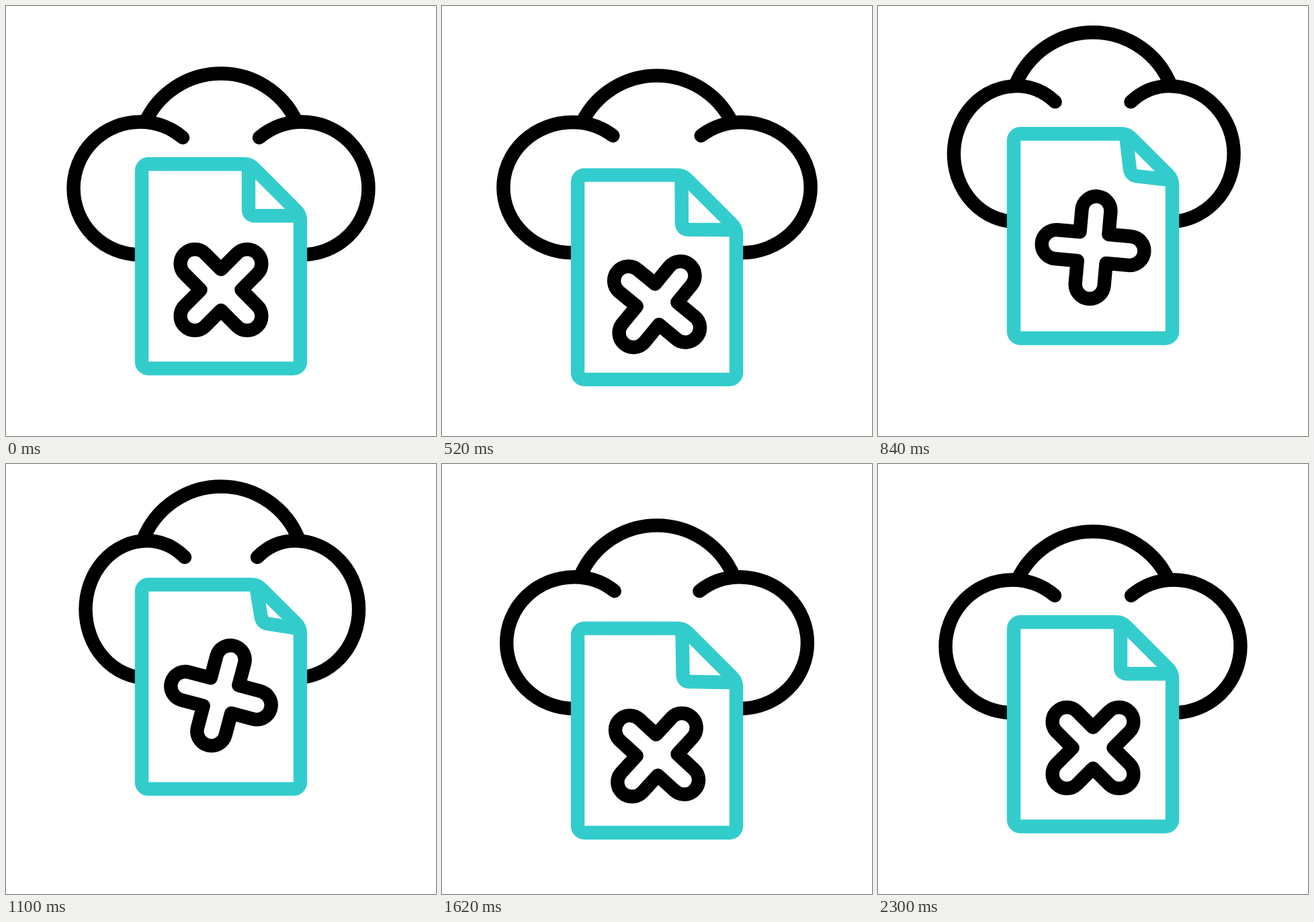
Write an HTML page that moves like this. It is 640 px wide and 640 px high and loops after 2.7 s.

```html
<!DOCTYPE html>
<html lang="en">
<head>
<meta charset="utf-8">
<title>Cloud file</title>
<style>
  html, body { margin: 0; width: 100%; height: 100%; overflow: hidden; background: #fff; }
  svg { display: block; width: 100vw; height: 100vh; }
  path { fill: none; stroke: #000; stroke-width: 20.4; stroke-linejoin: round; }
  .round { stroke-linecap: round; }
  .page { stroke: #33cccc; fill: #fff; }
  .fold { stroke: #33cccc; }
</style>
</head>
<body>
<svg viewBox="0 0 640 640">
  <path id="dome"/>
  <path id="left" class="round"/>
  <path id="right" class="round"/>
  <g id="doc">
    <path id="page" class="page"/>
    <path id="fold" class="fold"/>
  </g>
  <path id="cross"/>
</svg>
<script>
const LOOP = 2700, STEP = 20;

// Offsets from rest at the extremes of the bounce
const rest = { page: 0, cross: 0, angle: 0, dome: 0, lobe: 0, side: 0, tip: 0, hinge: 0, corner: 0 };
const squash = { page: 40, cross: 54, angle: -27, dome: 30, lobe: 23, side: -17, tip: -12, hinge: -9, corner: -11 };
const peak = { page: -56, cross: -78, angle: 60, dome: -68, lobe: -59, side: 18, tip: 3, hinge: 11, corner: 20 };
const hop = { page: -25, cross: -38, angle: 25, dome: -36, lobe: -23, side: 25, tip: 7, hinge: 9, corner: 18 };

// The cloud turns early, its width and the fold turn late
const delay = { dome: -50, lobe: -50, side: 50, tip: 50, hinge: 50, corner: 50 };

const smooth = u => u * u * (3 - 2 * u);
const rise = u => smooth(u ** 0.75);
const fall = u => smooth(u ** 2.3);
const settle = u => 1 - (1 - u) ** 3;

const keys = [
  { at: 200, pose: rest },
  { at: 380, pose: squash, ease: smooth },
  { at: 1010, pose: peak, ease: rise, delayed: true },
  { at: 1490, pose: squash, ease: fall, delayed: true },
  { at: 1760, pose: hop, ease: smooth },
  { at: 2300, pose: rest, ease: settle }
];

function value(t, name) {
  const when = key => key.at + (key.delayed && delay[name] || 0);
  const i = keys.findIndex(key => t < when(key));
  if (i < 1) return 0;
  const a = keys[i - 1], b = keys[i];
  const u = (t - when(a)) / (when(b) - when(a));
  return a.pose[name] + (b.pose[name] - a.pose[name]) * b.ease(u);
}

const el = id => document.getElementById(id);
const draw = (id, d) => el(id).setAttribute('d', d);

// One cloud lobe; dir is 1 on the left, -1 on the right
function lobe(dir, side, mid, tip, top, ry) {
  const x = n => dir > 0 ? n : 640 - n;
  const rx = mid - side, sweep = dir > 0 ? 0 : 1;
  const tipY = top + 23.3 + 0.38 * (tip - 263);
  return `M${x(tip)} ${tipY}Q${x(mid + 0.567 * (tip - mid))} ${top} ${x(mid)} ${top}`
    + `A${rx} ${ry} 0 0 ${sweep} ${x(side)} ${top + ry}`
    + `A${rx} ${ry} 0 0 ${sweep} ${x(mid)} ${top + 2 * ry}`
    + `H${x(Math.max(mid, 202))}`;
}

function cloud(domeTop, top, dSide, dTip) {
  const side = 100.5 + dSide, mid = 199.5 + 0.57 * dSide;
  const ry = 98.8 + 0.18 * dSide, tip = 263 + dTip;
  const height = top - domeTop;
  const x = 207.5 - 0.45 * (height - 72), half = 320 - x;
  const r = (half * half + height * height) / (2 * height);
  draw('dome', `M${x} ${top}A${r} ${r} 0 0 1 ${640 - x} ${top}`);
  draw('left', lobe(1, side, mid, tip, top, ry));
  draw('right', lobe(-1, side - Math.max(0, dSide) * 0.2, mid, tip, top, ry));
}

function page(y, h, c) {
  draw('page', `M212 235.3H${354 + h}Q${363 + h} 235.3 ${369 + h} 241.4`
    + `L432 ${304.4 - h}Q438 ${310.4 - h} 438 ${319 - h}V529.5`
    + 'A10 10 0 0 1 428 539.5H212A10 10 0 0 1 202 529.5V245.3A10 10 0 0 1 212 235.3Z');
  const cx = 361 + c, cy = 312.3 - c;
  const toward = (x, y) => {
    const n = 10 / Math.hypot(x - cx, y - cy);
    return `${cx + (x - cx) * n} ${cy + (y - cy) * n}`;
  };
  const ax = 361 + h, ay = 236, bx = 438, by = 312.3 - h;
  draw('fold', `M${ax} ${ay}L${toward(ax, ay)}Q${cx} ${cy} ${toward(bx, by)}L${bx} ${by}`);
  el('doc').setAttribute('transform', `translate(0 ${y})`);
}

function crossPath(w, len) {
  const cap = (x, y) => `A${w} ${w} 0 0 1 ${x} ${y}`;
  return `M${-w} ${-len}${cap(w, -len)}V${-w}H${len}${cap(len, w)}H${w}V${len}`
    + `${cap(-w, len)}V${w}H${-len}${cap(-len, -w)}H${-w}Z`;
}
draw('cross', crossPath(21.5, 55));

function frame() {
  const t = Math.floor(performance.now() % LOOP / STEP) * STEP;
  const v = name => value(t, name);
  cloud(100.5 + v('dome'), 172.5 + v('lobe'), v('side'), v('tip'));
  page(v('page'), v('hinge'), v('corner'));
  el('cross').setAttribute('transform',
    `translate(320 ${422.5 + v('cross')}) rotate(${45 + v('angle')})`);
  requestAnimationFrame(frame);
}
frame();
</script>
</body>
</html>
```
